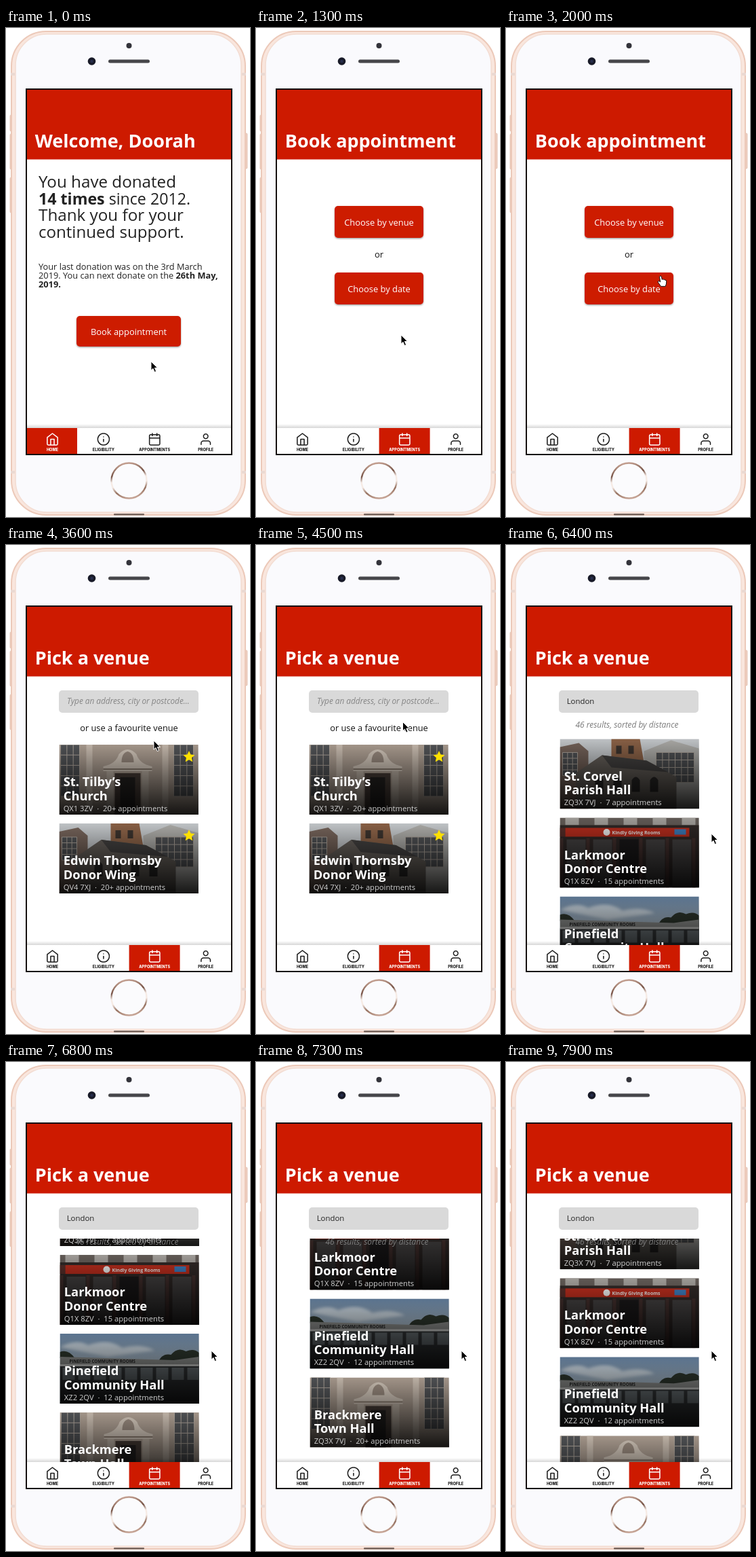
Write an HTML page that moves like this. It is 360 by 720 pixels and loops after 8000 ms.

```html
<!DOCTYPE html>
<html lang="en">
<head>
<meta charset="utf-8">
<title>Donor app</title>
<style>
html, body { margin: 0; width: 100%; height: 100%; overflow: hidden; background: #fff; }
svg { display: block; }
#stage { width: 100vw; height: 100vh; }
text { font-family: "Open Sans", "Noto Sans", sans-serif; white-space: pre; }
.b { font-weight: 700; }
.i { font-style: italic; }
.m { text-anchor: middle; }
.nav { font: 800 5.6px Inter, sans-serif; text-anchor: middle; }
</style>
</head>
<body>
<svg id="stage" viewBox="0 0 360 720">
  <defs>
    <linearGradient id="shade" x2="0" y2="1">
      <stop offset="0" stop-opacity=".1"/><stop offset=".4" stop-opacity=".42"/><stop offset="1" stop-opacity=".88"/>
    </linearGradient>
    <linearGradient id="sky" x2="0" y2="1">
      <stop offset="0" stop-color="#64809f"/><stop offset=".4" stop-color="#a9bac8"/>
    </linearGradient>
    <linearGradient id="lift" x2="0" y2="1">
      <stop offset="0" stop-opacity="0"/><stop offset="1" stop-opacity=".16"/>
    </linearGradient>
    <linearGradient id="ring" x1=".4" x2=".6" y2="1">
      <stop offset="0" stop-color="#c4a091"/><stop offset=".3" stop-color="#775447"/>
      <stop offset=".46" stop-color="#f6ebe5"/><stop offset=".6" stop-color="#f6ebe5"/>
      <stop offset=".78" stop-color="#94705f"/><stop offset="1" stop-color="#c9a798"/>
    </linearGradient>
    <filter id="drop" x="-10%" y="-10%" width="120%" height="140%">
      <feDropShadow dx="0" dy="1.2" stdDeviation="1" flood-opacity=".4"/>
    </filter>
    <filter id="soft"><feGaussianBlur stdDeviation="2"/></filter>
    <clipPath id="view"><path d="M30 260H333V589H30Z"/></clipPath>
  </defs>
  <g id="phone"></g>
  <g id="pages"></g>
  <g id="bar"></g>
  <rect x="30" y="90" width="303" height="538" fill="none" stroke="#151010" stroke-width="2"/>
  <g id="mouse" stroke-linejoin="round">
    <path id="arrow" d="M0 0V13.2L3 10.4L5.2 15.6L7.6 14.6L5.4 9.5H9.6Z" fill="#000" stroke="#fff"/>
    <path id="hand" fill="#fff" stroke="#111"
      d="M-1.6 1Q0-1 1.4 1L2.2 5.4Q3.6 4 4.5 5.6Q6 4.6 6.8 6.2Q8.6 5.8 8.8 8L8.4 12L7.2 15.4H.6L-3.6 9.6Q-4.4 7.4-2.2 7.6L-.3 9Z"/>
  </g>
</svg>
<script>
const RED = '#cd1a00';
const $ = id => document.getElementById(id);
const rect = (x, y, w, h, fill, extra = '') =>
  `<rect x="${x}" y="${y}" width="${w}" height="${h}" fill="${fill}" ${extra}/>`;
const text = (x, y, size, str, fill = '#222', cls = '') =>
  `<text x="${x}" y="${y}" font-size="${size}" fill="${fill}" class="${cls}">${str}</text>`;
const path = (d, fill, extra = '') => `<path d="${d}" fill="${fill}" ${extra}/>`;
const repeat = (n, f) => Array.from({ length: n }, (_, i) => f(i)).join('');
const header = title => rect(30, 90, 303, 103.5, RED) + text(42.8, 176.4, 27, title, '#fff', 'b');
const button = (x, y, w, h, label) =>
  rect(x, y, w, h, RED, 'rx="5" filter="url(#drop)"') +
  text(x + w / 2, y + h / 2 + 5, 12.9, label, '#fff', 'm');

// Simplified scenes, each 205 by 103
const panes = (x, y, w, h, cols, rows) =>
  rect(x, y, w, h, '#55575a') +
  repeat(cols + 1, i => rect(x + i * w / cols - .5, y, 1, h, '#b5aca2')) +
  repeat(rows + 1, i => rect(x, y + i * h / rows - .5, w, 1, '#b5aca2'));
const scenes = {
  hall: rect(0, 0, 205, 103, '#b3a497') + panes(2, 0, 28, 76, 3, 5) + panes(169, 0, 29, 76, 3, 5) +
    rect(40, 0, 9, 103, '#cfc2b5') + rect(152, 0, 9, 103, '#cfc2b5') +
    path('M65 32Q84 28 88 14Q101 0 114 14Q118 28 137 32V39H65Z', '#d9cdc0') +
    path('M92 26Q92 12 101 10Q110 12 110 26Z', '#9c8d81') + rect(65, 35, 72, 2, '#8d7e72') +
    rect(70, 39, 10, 64, '#c7bbae') + rect(122, 39, 10, 64, '#c7bbae') +
    rect(82, 42, 38, 61, '#4a3f39') + rect(90, 48, 22, 55, '#262322'),
  church: rect(0, 0, 205, 103, '#d3d7da') +
    path('M0 12L28 6L42 18V103H0Z', '#7d6a60') + panes(4, 20, 22, 34, 3, 4) +
    path('M76 0H118L124 34H76Z', '#95694c') + rect(83, 10, 8, 12, '#3f3630') + rect(101, 10, 8, 12, '#3f3630') +
    path('M124 18L164 2L205 14V103H124Z', '#b9b8b4') + panes(142, 20, 56, 44, 6, 4) +
    path('M24 50L62 24L128 32L172 56V103H24Z', '#6b655f') + path('M62 24L128 32L160 49L76 42Z', '#484645') +
    repeat(4, i => path(`M${52 + i * 27} 78V61q6-10 12 0V78Z`, '#2c2a29')),
  shop: rect(0, 0, 205, 103, '#6a625d') + repeat(5, i => rect(8 + i * 43, 0, 20, 11, '#aeaaa5')) +
    rect(0, 11, 205, 92, '#332b29') +
    repeat(5, i => rect(10 + i * 39, 32, 28, 71, i == 2 ? '#1d1b1c' : '#4c4949')) +
    repeat(6, i => rect(i * 39, 30, 5, 73, '#4b3532')) +
    rect(0, 15, 8, 13, '#5c302b') + rect(8, 15, 183, 13, '#c8301f') +
    `<circle cx="69" cy="21.5" r="5" fill="#fff"/>` + text(77, 24.5, 7, 'Kindly Giving Rooms', '#fff', 'b') +
    rect(169, 17, 17, 8, '#3f83c8'),
  centre: rect(0, 0, 205, 103, 'url(#sky)') +
    path('M0 20Q24 7 42 17Q72 6 92 21Q122 14 140 25L70 34Z', '#d8e0e5', 'filter="url(#soft)" opacity=".75"') +
    path('M144 44Q150 28 164 31Q174 19 186 26Q198 21 205 28V60H144ZM0 27Q12 22 22 36H0Z', '#2c352c') +
    path('M0 34L168 39L205 34V103H0Z', '#8b8d8b') + rect(0, 47, 205, 56, '#36393b') +
    text(14, 43, 6.2, 'PINEFIELD COMMUNITY ROOMS', '#222', 'b') +
    repeat(9, i => rect(4 + i * 23, 50, 18, 18, '#6f777b')) + rect(0, 45, 205, 3, '#cfd0ce')
};
const star = cx => path(`M${cx} 9l2.5 5.6 6.1.6-4.6 4.1 1.3 6-5.3-3.1-5.3 3.1 1.3-6-4.6-4.1 6.1-.6Z`, '#ffe000');
const card = (x, y, scene, line1, line2, code, slots, fav) =>
  `<svg x="${x}" y="${y}" width="205.5" height="103">${scenes[scene]}${rect(0, 0, 206, 103, 'url(#shade)')}` +
  text(6.3, 61, 18.3, line1, '#fff', 'b') + text(6.3, 81.5, 18.3, line2, '#fff', 'b') +
  text(6.3, 97.5, 11.2, `${code}  ·  ${slots} appointments`, '#d0d0d0') + (fav ? star(191.5) : '') + '</svg>';

const home = header('Welcome, Doorah') +
  [['You have donated', 24.2], ['<tspan class="b">14 times</tspan> since 2012.', 23.2],
   ['Thank you for your', 24.2], ['continued support.', 24.1]]
    .map(([s, size], i) => text(48, 235 + i * 24.6, size, s)).join('') +
  ['Your last donation was on the 3rd March', '2019. You can next donate on the <tspan class="b">26th May,</tspan>', '<tspan class="b">2019.</tspan>']
    .map((s, i) => text(48, 356 + i * 13, 12.8, s)).join('') +
  button(104, 424, 154, 45, 'Book appointment');

const book = header('Book appointment') + button(116, 262, 131, 47, 'Choose by venue') +
  text(181.5, 338, 13, 'or', '#111', 'm') + button(116, 360, 131, 47, 'Choose by date');

const search = header('Pick a venue') + rect(78, 214, 206, 33, '#d9d9d9', 'rx="5"');
const favourites = search +
  text(90, 234.3, 11.8, 'Type an address, city or postcode...', '#858585', 'i') +
  text(181.5, 274, 12.8, 'or use a favourite venue', '#111', 'm') +
  card(78.5, 294, 'hall', 'St. Tilby’s', 'Church', 'QX1 3ZV', '20+', true) +
  card(78.5, 410, 'church', 'Edwin Thornsby', 'Donor Wing', 'QV4 7XJ', '20+', true);

const results = search + text(89.7, 234.3, 11.4, 'London') +
  '<g clip-path="url(#view)"><g id="list">' +
  [['church', 'St. Corvel', 'Parish Hall', 'ZQ3X 7VJ', '7'], ['shop', 'Larkmoor', 'Donor Centre', 'Q1X 8ZV', '15'],
   ['centre', 'Pinefield', 'Community Hall', 'XZ2 2QV', '12'], ['hall', 'Brackmere', 'Town Hall', 'ZQ3X 7VJ', '20+']]
    .map((c, i) => card(79.5, 285.5 + i * 116, ...c)).join('') +
  '</g></g>' + text(178.5, 268.8, 11.95, '46 results, sorted by distance', '#7c7c7c', 'i m');

const side = (x, y, h) => rect(x, y, 3, h, '#efd0c2', 'rx="1.5" stroke="#d9b09d" stroke-width=".6"');
$('phone').innerHTML = side(6, 128, 24) + side(6, 156, 52) + side(6, 220, 52) + side(353, 155, 52) +
  rect(8, 5, 345, 712, '#f9e6dd', 'rx="51" stroke="#ecc9b9" stroke-width="2"') +
  rect(14, 9, 333, 704, '#fafafd', 'rx="46" stroke="#f3ddd3" stroke-width="1.6"') +
  [66, 652].map(y => rect(7, y, 6, 4, '#ead9d2') + rect(348, y, 6, 4, '#ead9d2')).join('') +
  `<circle cx="181.5" cy="26" r="4" fill="#33333a"/><circle cx="126.5" cy="49" r="5.8" fill="#181a28"/>
   <circle cx="126.5" cy="49" r="2.2" fill="#262d4c"/>` + rect(151, 46.5, 61, 5, '#46464a', 'rx="2.5"') +
  '<circle cx="181.5" cy="666.5" r="26" fill="#fbfbfd" stroke="url(#ring)" stroke-width="2.4"/>' +
  rect(159, 715, 45, 2.5, '#77665f', 'rx="1"') + rect(30, 90, 303, 538, '#fff');
$('pages').innerHTML = [home, book, favourites, results].map(p => `<g>${p}</g>`).join('');

const tabs = [
  ['HOME', 'M3 9L12 2L21 9V20a2 2 0 0 1-2 2H5a2 2 0 0 1-2-2ZM9 22V12H15V22'],
  ['ELIGIBILITY', 'M12 2a10 10 0 1 0 .01 0ZM12 16V12M12 8h.01'],
  ['APPOINTMENTS', 'M5 4H19a2 2 0 0 1 2 2V20a2 2 0 0 1-2 2H5a2 2 0 0 1-2-2V6a2 2 0 0 1 2-2ZM16 2V6M8 2V6M3 10H21'],
  ['PROFILE', 'M20 21V19a4 4 0 0 0-4-4H8a4 4 0 0 0-4 4V21M12 3a4 4 0 1 0 .01 0Z']
];
function drawBar(active) {
  $('bar').innerHTML = rect(30, 583, 303, 6, 'url(#lift)') + rect(30, 589, 303, 39, '#fff') +
    tabs.map(([label, d], i) => {
      const on = i == active, cx = 68.5 + i * 75.4, color = on ? '#fff' : '#1c1c1c';
      return (on ? rect(30 + i * 75.8, 589, 75, 39, RED) : '') +
        `<path d="${d}" transform="translate(${cx - 10.2} 595.3) scale(.85)" fill="none" stroke="${color}"
          stroke-width="1.8" stroke-linecap="round" stroke-linejoin="round"/>` +
        `<text x="${cx}" y="622.8" class="nav" fill="${color}">${label}</text>`;
    }).join('');
}

// Keys are [time, values...]; each move slows down towards its end
function tween(keys, t) {
  const k = keys.findIndex(key => key[0] > t);
  if (k < 0) return keys[keys.length - 1].slice(1);
  if (k == 0) return keys[0].slice(1);
  const a = keys[k - 1], b = keys[k], u = (t - a[0]) / (b[0] - a[0]), e = 1 - (1 - u) ** 2;
  return a.slice(1).map((v, i) => v + (b[i + 1] - v) * e);
}
const mousePath = [[0, 214, 491], [800, 214, 452], [1300, 214, 452], [1900, 228, 365], [2100, 228, 365],
  [2700, 218, 288], [4300, 218, 288], [5000, 215, 232], [5700, 215, 232], [6300, 303, 425]];
const scroll = [[6500, 0], [7170, 169], [7700, 169], [8370, 0]];
const pageStarts = [0, 1300, 3000, 5600];
const targets = [[[104, 424, 154, 45]], [[116, 262, 131, 47], [116, 360, 131, 47]], [], []];
const show = (el, on) => el.style.display = on ? '' : 'none';
let shown = -1;

function frame() {
  const t = Math.floor(performance.now() % 8000 / 100) * 100;
  const page = pageStarts.filter(start => start <= t).length - 1;
  if (page != shown) {
    [...$('pages').children].forEach((g, i) => show(g, i == page));
    drawBar(page ? 2 : 0);
    shown = page;
  }
  const [x, y] = tween(mousePath, t);
  const over = targets[page].some(([a, b, w, h]) => x > a && x < a + w && y > b && y < b + h);
  $('mouse').setAttribute('transform', `translate(${x} ${y})`);
  show($('hand'), over);
  show($('arrow'), !over);
  $('list').setAttribute('transform', `translate(0 ${-tween(scroll, t)[0]})`);
  requestAnimationFrame(frame);
}
frame();
</script>
</body>
</html>
```
